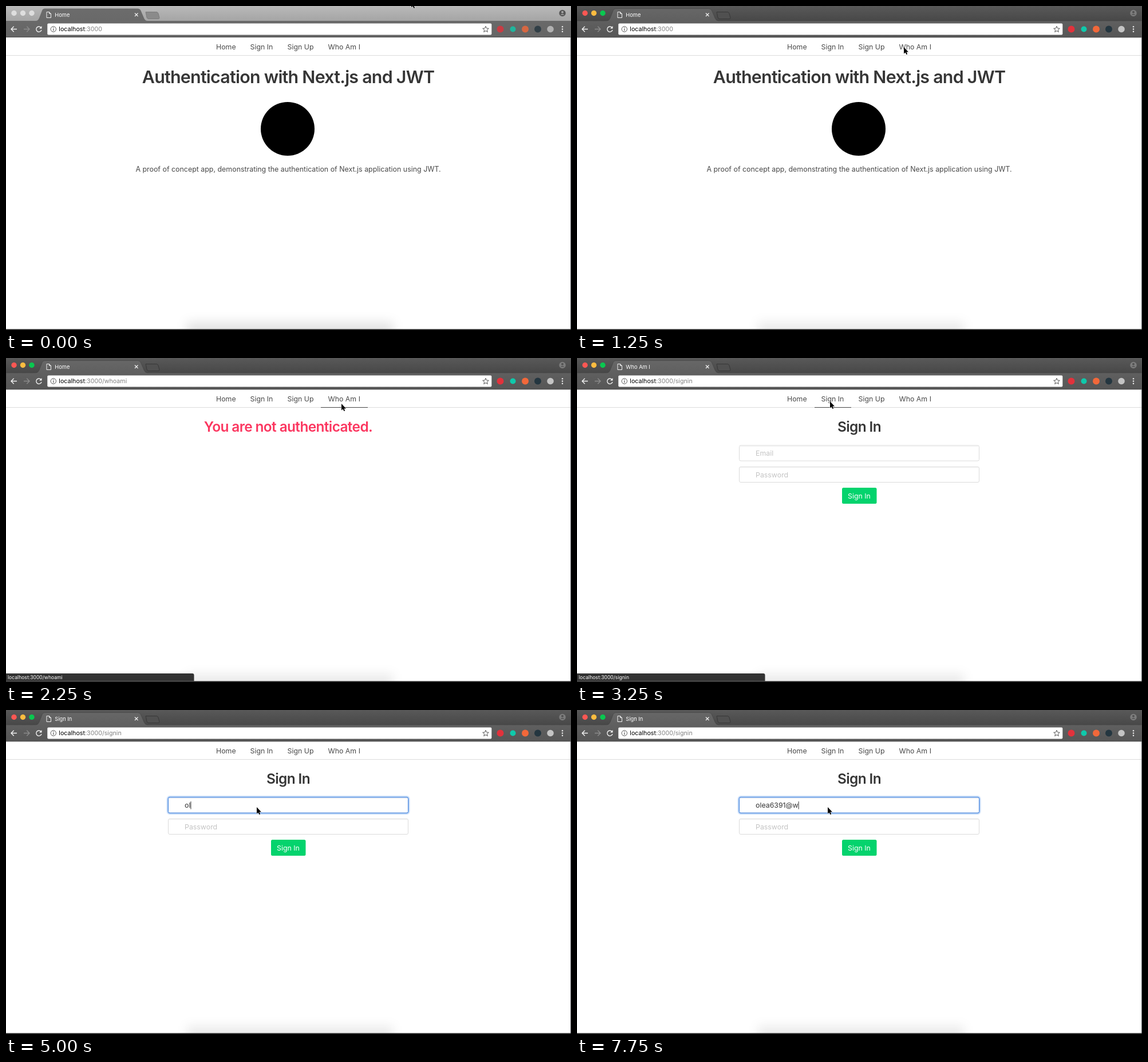
Write an HTML page that moves like this. It is 987 px wide and 567 px high and loops after 8 s.

```html
<!DOCTYPE html>
<html lang="en">
<head>
<meta charset="utf-8">
<title>Authentication demo</title>
<style>
  html, body { margin: 0; width: 100%; height: 100%; overflow: hidden; background: #fff; }
  svg { display: block; width: 987px; height: 567px; font-family: Inter, "Open Sans", sans-serif; font-optical-sizing: none; }
  text { white-space: pre; }
  .body { font-size: 12.35px; fill: #4a4a4a; }
  .heading { font-weight: 600; fill: #363636; letter-spacing: -.025em; text-anchor: middle; }
  .middle { text-anchor: middle; }
  .hint { fill: #c4c4c4; }
  .field { fill: #fff; stroke: #dbdbdb; }
  .field.hover { stroke: #b0b0b0; }
  .field.focus { stroke: #4a86dc; }
  .line { fill: none; stroke: #f2f2f2; stroke-width: 1.4; }
  .inactive .activeOnly, .active .inactiveOnly { display: none; }
  .inactive #extensions { opacity: .8; }
  #dock { fill-opacity: .08; }
  .inactive #dock { fill-opacity: .11; }
  [hidden] { display: none; }
</style>
</head>
<body>
<svg id="stage" class="inactive" viewBox="0 0 987 567">
  <defs>
    <linearGradient id="stripOff" x2="0" y2="1"><stop stop-color="#b9b9b9"/><stop offset="1" stop-color="#a4a4a4"/></linearGradient>
    <linearGradient id="stripOn" x2="0" y2="1"><stop stop-color="#595959"/><stop offset="1" stop-color="#474747"/></linearGradient>
    <linearGradient id="barOff" gradientUnits="userSpaceOnUse" x1="0" y1="4" x2="0" y2="55"><stop stop-color="#6c6c6c"/><stop offset="1" stop-color="#656565"/></linearGradient>
    <linearGradient id="barOn" gradientUnits="userSpaceOnUse" x1="0" y1="4" x2="0" y2="55"><stop stop-color="#676767"/><stop offset="1" stop-color="#565656"/></linearGradient>
    <filter id="soft" x="-10%" y="-150%" width="120%" height="400%"><feGaussianBlur stdDeviation="9"/></filter>
    <filter id="glow" x="-5%" y="-30%" width="110%" height="160%"><feGaussianBlur stdDeviation="1"/></filter>
    <path id="newTab" d="M244 10.500H263Q265 10.500 266 13L268 20.500Q268 22.500 266 22.500H249Q247 22.500 246 20Z"/>
    <path id="tabShape" d="M0 26H52Q56 26 58 21L63 8Q64 4.500 68 4.500H230Q234 4.500 235.500 8L241 21Q243 26 247 26H987V55H0Z"/>
  </defs>

  <rect width="987" height="567" fill="#fff"/>
  <rect id="dock" x="316" y="553" width="360" height="30" filter="url(#soft)"/>

  <!-- window frame -->
  <g class="inactiveOnly">
    <rect width="987" height="27" fill="url(#stripOff)"/>
    <use href="#newTab" fill="#8a8a8a" stroke="#7b7b7b"/>
    <g fill="#dedede"><circle cx="14" cy="12.500" r="4.700"/><circle cx="29.500" cy="12.500" r="4.700"/><circle cx="45" cy="12.500" r="4.700"/></g>
    <use href="#tabShape" fill="url(#barOff)"/>
  </g>
  <g class="activeOnly">
    <rect width="987" height="27" fill="url(#stripOn)"/>
    <use href="#newTab" fill="#505050" stroke="#383838"/>
    <circle cx="14" cy="12.500" r="4.700" fill="#fc5753"/>
    <circle cx="29.500" cy="12.500" r="4.700" fill="#fdbc40"/>
    <circle cx="45" cy="12.500" r="4.700" fill="#0ac850"/>
    <use href="#tabShape" fill="url(#barOn)" stroke="#414141" stroke-width=".6"/>
  </g>
  <path d="M0 54.500H987" stroke="#505050"/>

  <path d="M71 10.500H75.500L78.500 13.500V20.500H71ZM75.500 10.500V13.500H78.500" class="line" style="stroke-width:1"/>
  <text id="tabTitle" x="85.300" y="18.800" font-size="9.300" fill="#fff"></text>
  <path d="M225 12.500L230.500 18M230.500 12.500L225 18" class="line" style="stroke-width:1.200"/>
  <g class="inactiveOnly" fill="#555"><circle cx="972" cy="12.500" r="5.700"/><circle cx="972" cy="10.700" r="1.900" fill="#aaa"/><path d="M968.500 15.500Q972 12 975.500 15.500Z" fill="#aaa"/></g>
  <g class="activeOnly" fill="#7d7d7d"><circle cx="972" cy="12.500" r="5.700"/><circle cx="972" cy="10.700" r="1.900" fill="#505050"/><path d="M968.500 15.500Q972 12 975.500 15.500Z" fill="#505050"/></g>

  <!-- toolbar -->
  <path d="M19 40.500H9M13.700 35.700L9 40.500L13.700 45.300" class="line"/>
  <path d="M31 40.500H41M36.300 35.700L41 40.500L36.300 45.300" class="line" style="stroke:#8b8b8b"/>
  <path d="M61 37.500A4.700 4.700 0 1 0 62 42" class="line"/>
  <path d="M62.500 35V39.500H58Z" fill="#f2f2f2"/>
  <rect x="72.300" y="30.600" width="776" height="19.800" rx="2" fill="#fff"/>
  <circle cx="82.800" cy="40.500" r="4.700" fill="none" stroke="#505050"/>
  <path d="M82.800 37.500V38.700M82.800 39.700V43.300" stroke="#505050" stroke-width="1.200"/>
  <text x="92.300" y="44.300" font-size="10.700" fill="#000">localhost<tspan id="path" fill="#808080"></tspan></text>
  <path id="star" fill="none" stroke="#555"/>
  <g id="extensions">
    <circle cx="863.500" cy="40.500" r="6" fill="#e2323c"/>
    <circle cx="885.500" cy="40.500" r="5" fill="#0fc9ab"/>
    <circle cx="907" cy="40.500" r="6" fill="#f2683a"/>
    <circle cx="929" cy="40.500" r="6" fill="#243640"/>
    <circle cx="951" cy="40.500" r="5.800" fill="#c4c4c4"/>
  </g>
  <g fill="#efefef"><circle cx="972" cy="36.300" r="1.200"/><circle cx="972" cy="40.500" r="1.200"/><circle cx="972" cy="44.700" r="1.200"/></g>

  <!-- navigation -->
  <path d="M0 86.500H987" stroke="#dbdbdb"/>
  <g class="body">
    <text x="367" y="75.500">Home</text><text x="426.500" y="75.500">Sign In</text>
    <text x="491.500" y="75.500">Sign Up</text><text x="562.500" y="75.500">Who Am I</text>
  </g>
  <path id="underline" stroke="#444"/>

  <!-- pages -->
  <g id="home">
    <text class="heading" x="493" y="135.300" font-size="30.400">Authentication with Next.js and JWT</text>
    <circle cx="492" cy="215" r="47" fill="#000"/>
    <text class="body middle" x="493" y="290" style="font-size:12.420px">A proof of concept app, demonstrating the authentication of Next.js application using JWT.</text>
  </g>
  <g id="whoami">
    <text class="heading" x="493" y="129.300" font-size="24.400" style="fill:#fb3760">You are not authenticated.</text>
  </g>
  <g id="signin">
    <text class="heading" x="493" y="129.300" font-size="24.400">Sign In</text>
    <rect id="halo" x="283" y="152.500" width="420" height="28" rx="3" fill="none" stroke="#6fa5ec" stroke-width="2.500" filter="url(#glow)"/>
    <rect id="email" class="field" x="283.500" y="153" width="419" height="27" rx="2.500"/>
    <rect class="field" x="283.500" y="190.500" width="419" height="27" rx="2.500"/>
    <path d="M285 154.500H701M285 192H701" stroke="#000" stroke-opacity=".05"/>
    <text id="emailHint" class="body hint" x="312" y="171.200">Email</text>
    <text id="typed" class="body" x="312" y="171.200" style="fill:#363636"></text>
    <rect id="caret" y="160" width="1" height="13.500" fill="#333"/>
    <text class="body hint" x="312" y="208.500">Password</text>
    <rect x="463" y="227" width="60.500" height="28" rx="2.500" fill="#04d36d"/>
    <text class="body middle" x="493" y="245.800" style="fill:#fff">Sign In</text>
  </g>

  <path d="M986.500 55V567" stroke="#5c5f63"/>
  <rect y="565.500" width="987" height="1.500" fill="#1c1c1c"/>
  <g id="status">
    <path d="M0 552H325.500Q328.500 552 328.500 555V565.500H0Z" fill="#333"/>
    <text id="statusText" x="3" y="562" font-size="8.600" fill="#fff"></text>
  </g>
  <path id="cursor" d="M0 0V11.500L2.600 9.200 4.400 13 6.200 12.200 4.500 8.500H8Z" stroke="#fff" stroke-width="1" paint-order="stroke"/>
</svg>
<script>
const $ = id => document.getElementById(id);
const LOOP = 8000;
const LINKS = { signin: [415, 479], signup: [479, 550], whoami: [550, 632] };
const ADDRESS = "olea6391@w";

const start = {
  active: false, cursor: [708, -9], tab: "Home", page: "home",
  link: "", status: "", email: "", typed: 0
};
const type = (at, typed) => [at, { typed }];
const steps = [
  [250, { cursor: [704, 8] }],
  [500, { cursor: [672, 34] }],
  [750, { cursor: [612, 62] }],
  [1000, { cursor: [578, 71], active: true }],
  [1250, { cursor: [571, 72] }],
  [1750, { cursor: [580, 77], link: "whoami" }],
  [2000, { cursor: [586, 80], status: "whoami" }],
  [2250, { page: "whoami" }],
  [2500, { tab: "Who Am I" }],
  [2750, { cursor: [512, 78], link: "signup" }],
  [3000, { cursor: [442, 76], link: "signin", status: "signin" }],
  [3250, { page: "signin" }],
  [3500, { tab: "Sign In" }],
  [3750, { cursor: [440, 122], link: "", status: "" }],
  [4000, { cursor: [438, 170], email: "hover" }],
  [4250, { email: "focus" }],
  type(4750, 1), type(5000, 2), type(5250, 3), type(5500, 4),
  type(6000, 5), type(6250, 7), type(6750, 8), type(7250, 9), type(7750, 10)
];

const show = (id, visible) => $(id).toggleAttribute("hidden", !visible);

function render(s) {
  $("stage").setAttribute("class", s.active ? "active" : "inactive");
  $("cursor").setAttribute("transform", `translate(${s.cursor})`);
  $("tabTitle").textContent = s.tab;
  $("path").textContent = ":3000" + (s.page === "home" ? "" : "/" + s.page);
  for (const page of ["home", "whoami", "signin"]) show(page, s.page === page);

  const [from, to] = LINKS[s.link] || [0, 0];
  $("underline").setAttribute("d", `M${from} 86.5H${to}`);
  show("status", s.status);
  $("statusText").textContent = "localhost:3000/" + s.status;

  const focused = s.email === "focus";
  $("email").setAttribute("class", "field " + s.email);
  show("halo", focused);
  show("caret", focused);
  show("emailHint", !s.typed);
  $("typed").textContent = ADDRESS.slice(0, s.typed);
  $("caret").setAttribute("x", 312 + (s.typed ? $("typed").getComputedTextLength() : 0));
}

function starPath(cx, cy, outer, inner) {
  const points = Array.from({ length: 10 }, (_, i) => {
    const r = i % 2 ? inner : outer, a = i * Math.PI / 5;
    return [cx + r * Math.sin(a), cy - r * Math.cos(a)];
  });
  return "M" + points.join("L") + "Z";
}
$("star").setAttribute("d", starPath(838, 41, 5.6, 2.5));

let shown = -1;
function tick() {
  const t = performance.now() % LOOP;
  const past = steps.filter(([at]) => at <= t);
  if (past.length !== shown) {
    shown = past.length;
    render(Object.assign({}, start, ...past.map(([, change]) => change)));
  }
  requestAnimationFrame(tick);
}
tick();
</script>
</body>
</html>
```
